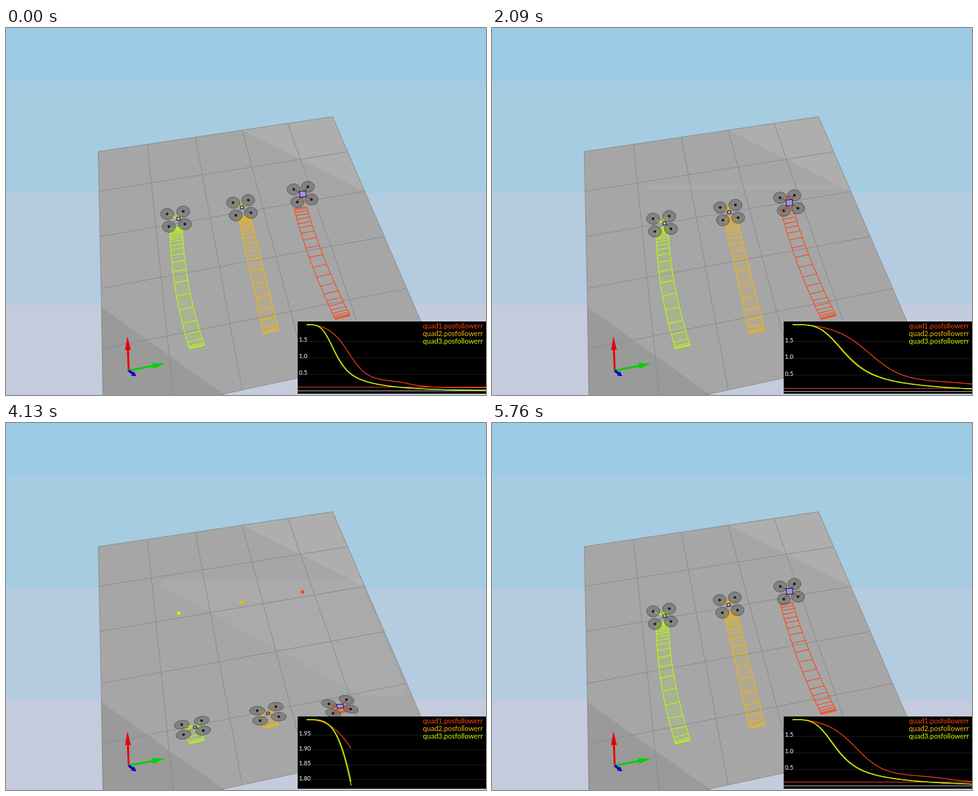
Recreate the animation shown at these times as an HTML page with a canvas. Size 757 px wide and 579 px high, loop 5860 ms.

```html
<!DOCTYPE html>
<html lang="en">
<head>
<meta charset="utf-8">
<title>Quadrotor position following</title>
<style>
  html, body { margin: 0; width: 100%; height: 100%; overflow: hidden; background: #c4cbdc; }
  canvas { position: absolute; left: 0; top: 0; display: block; }
  .legend { position: absolute; right: 5px; top: 464px; text-align: right;
    font: 400 11.1px/12px Lato, "Open Sans", sans-serif; }
  .legend div { height: 12px; white-space: nowrap; }
</style>
</head>
<body>
<canvas id="view" width="757" height="579"></canvas>
<div class="legend">
  <div style="color:#ff4410">quad1.posfollowerr</div>
  <div style="color:#ffbf00">quad2.posfollowerr</div>
  <div style="color:#bfff00">quad3.posfollowerr</div>
</div>
<script>
const W = 757, H = 579, LOOP = 5860;
const RATE = 0.25;                     // plot units per ms
const STARTS = [-2880, 514, 3850];     // launch times within the loop
const STEP = 14, TRAIL_END = 322;      // trail sampling

const ctx = document.getElementById('view').getContext('2d');
const clamp = v => Math.max(0, Math.min(1, v));
const mix = (a, b, k) => a + (b - a) * k;
const bump = (u, mid, width) => Math.exp(-(((u - mid) / width) ** 2));
const fall = (u, mid, power) => 1 / (1 + (u / mid) ** power);

// Position error over time: a main drop followed by a slow settling tail.
const errFast = u => 1.8 * fall(u, 118, 3.8) + 0.2 * fall(u, 330, 4);
const errSlow = u => {
  const growth = Math.exp((u - 169) / 37) * (1 - bump(u, 0, 50));
  return 1.71 / (1 + growth) + 0.2 * fall(u, 420, 12) + 0.09;
};

// Lean forward to accelerate (negative), back to brake (positive).
const tilt = u => bump(u, 205, 70) - bump(u, 58, 34);

const quads = [
  { color: '#ff4410', from: [531, 456.5], to: [459, 263.5], dot: [467.5, 266.5],
    bow: 24, miss: 0.05, drift: 9, pace: 0.8, hub: 11, hubX: 0.5, fill: 0, err: errSlow },
  { color: '#f8b800', from: [418, 479], to: [372, 282.5], dot: [372, 283],
    bow: 0, miss: 0, drift: 0, pace: 1, hub: 6, hubX: 0, fill: 0.13, err: u => errFast(u * 0.982) },
  { color: '#b9ff00', from: [301, 503], to: [268.2, 300.4], dot: [272.5, 300],
    bow: 33, miss: 0, drift: 0, pace: 1, hub: 6, hubX: 4, fill: 0.13, err: errFast }
];

// Remaining share of the way, and the point on the path that belongs to it.
const remaining = (q, u) => q.err(u) / 2 - q.miss * clamp((u - 250) / 60);
const pathAt = (q, f) => [
  mix(q.to[0], q.from[0], f) - q.bow * f * (1 - f),
  mix(q.to[1], q.from[1], f)
];

function poly(points, fill, stroke, closed = true) {
  ctx.beginPath();
  points.forEach(([x, y], i) => i ? ctx.lineTo(x, y) : ctx.moveTo(x, y));
  if (closed) ctx.closePath();
  if (fill) { ctx.fillStyle = fill; ctx.fill(); }
  if (stroke) { ctx.strokeStyle = stroke; ctx.stroke(); }
}
const line = (p, q, color) => poly([p, q], null, color, false);
function rect(x, y, w, h, color) { ctx.fillStyle = color; ctx.fillRect(x, y, w, h); }
function oval(x, y, rx, ry, turn, fill, stroke) {
  ctx.beginPath();
  ctx.ellipse(x, y, rx, ry, turn, 0, Math.PI * 2);
  ctx.fillStyle = fill;
  ctx.fill();
  if (stroke) { ctx.strokeStyle = stroke; ctx.stroke(); }
}

// Perspective map of the unit square to four screen corners.
function perspective([x0, y0], [x1, y1], [x2, y2], [x3, y3]) {
  const ax = x1 - x2, ay = y1 - y2, bx = x3 - x2, by = y3 - y2;
  const sx = x0 - x1 + x2 - x3, sy = y0 - y1 + y2 - y3, det = ax * by - ay * bx;
  const g = (sx * by - sy * bx) / det, h = (ax * sy - ay * sx) / det;
  return (s, t) => {
    const w = 1 + g * s + h * t;
    return [
      (x0 + (x1 - x0 + g * x1) * s + (x3 - x0 + h * x3) * t) / w,
      (y0 + (y1 - y0 + g * y1) * s + (y3 - y0 + h * y3) * t) / w
    ];
  };
}
const project = perspective([145.5, 195], [515, 140], [632, 411], [152, 506]);
const tile = (col, row) => project(col / 5, row / 4);

function drawWorld(top) {
  ['#9bcbe5', '#a5cce1', '#b4cbe0', '#c4cbdc']
    .forEach((color, i) => rect(0, i && 84 + (i - 1) * 176.5 | 0, W, H, color));

  const floor = [tile(0, 0), tile(5, 0), tile(5, 5), tile(0, 5)];
  ctx.lineWidth = 1;
  poly(floor, '#a6a6a6');
  poly([[372, 161], tile(5, 0), tile(5, 2)], '#aeaeae');
  poly([[150, 440], [345, 579], [152, 579]], '#9a9a9a');
  if (top > 250) {
    ctx.save();
    ctx.beginPath();
    ctx.rect(244, 247, 420, top - 247);
    ctx.clip();
    poly([[244, 247], [559, 247], [655, 482], [378, 330], [244, 257]], 'rgba(255,255,255,.045)');
    ctx.restore();
  }
  for (let i = 1; i < 5; i++) {
    line(tile(i, 0), tile(i, 5), '#8a8a8a');
    line(tile(0, i), tile(5, i), '#8a8a8a');
  }
  poly(floor, null, '#8c8c8c');
}

// Shaft from the origin with a cone at its end.
function drawArrow(dx, dy, shaft, width, half, color) {
  const x = 193.5, y = 540.5, len = Math.hypot(dx, dy), nx = -dy / len * half, ny = dx / len * half;
  const bx = x + dx * shaft, by = y + dy * shaft;
  ctx.lineWidth = width;
  line([x, y], [bx, by], color);
  poly([[x + dx, y + dy], [bx + nx, by + ny], [bx - nx, by - ny]], color);
}

function drawTrail(q, u) {
  const left = [], right = [];
  for (let s = 0; s <= Math.min(u, TRAIL_END); s += STEP) {
    const f = remaining(q, s), [x, y] = pathAt(q, f);
    const dx = mix(9.5, 11.8, f), dy = mix(-1.6, -2.9, f);
    left.push([x - dx, y - dy]);
    right.push([x + dx, y + dy]);
  }
  ctx.lineWidth = 1.1;
  ctx.globalAlpha = q.fill;
  poly([...left, ...right.slice().reverse()], q.color);
  ctx.globalAlpha = 1;
  poly(left, null, q.color, false);
  poly(right, null, q.color, false);
  left.forEach((p, i) => line(p, right[i], q.color));
}

function poseOf(q, u, i) {
  const f = remaining(q, u), k = tilt(u * q.pace), [x, y] = pathAt(q, f);
  const size = 1 + 0.13 * f, ahead = Math.max(0, -k), back = Math.max(0, k);
  return {
    x: x + q.drift * clamp((u - 290) / 150), y,
    a: [14 * size * (1 + 0.1 * ahead), 8 * size * (1 - 0.55 * ahead + 0.3 * back)],
    b: [(8.3 + 1.5 * i) * size * (1 + 0.15 * ahead), -12 * size * (1 - 0.2 * ahead - -0.08 * back)],
    rx: 10.3 * size * (1 + 0.05 * ahead),
    ry: 8.8 * size * (1 - 0.36 * ahead + 0.13 * back),
    turn: 0.2 * ahead * (1 - i)
  };
}

function drawQuad(q, { x, y, a, b, rx, ry, turn }) {
  const rotors = [[a, -1], [b, 1], [b, -1], [a, 1]].map(([v, s]) => [x + s * v[0], y + s * v[1]]);
  const hx = x + q.hubX, hy = y - 0.5, big = q.hub > 8;
  ctx.lineWidth = 2.4;
  rotors.forEach((r, i) => {
    ctx.globalAlpha = i < 2 || big ? 1 : 0.4;
    line([hx, hy], r, i < 2 || big ? q.color : '#77728c');
  });
  ctx.globalAlpha = 1;
  ctx.lineWidth = 1;
  for (const r of rotors) oval(...r, rx, ry, turn, 'rgba(108,108,108,.62)', '#585858');
  for (const r of rotors) {
    oval(...r, 2.1, 2.1, 0, '#15151f');
    rect(r[0], r[1] - 1, 1.5, 1.5, '#20208c');
  }
  const s = q.hub / 2, h = s * Math.min(1, ry / rx + 0.08);
  ctx.lineWidth = 1.2;
  poly([[hx - s, hy - h + 1], [hx + s - 1, hy - h], [hx + s, hy + h - 1], [hx - s + 1, hy + h]],
    big ? '#9c94e6' : 'rgba(205,200,240,.5)', '#1c1c50');
}

function drawPlot(u) {
  const low = Math.min(...quads.map(q => q.err(u)), 1.998);
  const lo = low * clamp((low - 0.04) / 0.1);
  const yOf = e => 468 + (2 - e) * 104 / (2 - lo);
  const sx = Math.min(1, 283 / Math.max(u, 1));
  const level = (y, color) => line([460, Math.round(y) + 0.5], [W, Math.round(y) + 0.5], color);

  rect(460, 463, 297, 114, '#000');
  ctx.save();
  ctx.beginPath();
  ctx.rect(460, 463, 297, 114);
  ctx.clip();
  ctx.lineWidth = 1;
  ctx.font = '400 9.5px Lato, "Open Sans", sans-serif';
  ctx.textBaseline = 'middle';

  // Smallest 1-2-5 step that gives fewer than five intervals.
  const range = 2 - lo, ten = 10 ** Math.floor(Math.log10(range / 5));
  const step = [1, 2, 5, 10].map(m => m * ten).find(s => range / s < 5);
  const digits = Math.max(1, -Math.floor(Math.log10(step) + 1e-9));
  for (let e = 2 - step; yOf(e) < 566; e -= step) {
    level(yOf(e), '#1c1c1c');
    ctx.fillStyle = '#fff';
    ctx.fillText(e.toFixed(digits), 462, yOf(e) - 1.5);
  }
  if (lo < 0.1) level(yOf(0.1) - 0.5, '#e0402c');
  if (lo < 0.04) level(yOf(0) - 0.5, '#b8b8b8');

  ctx.lineWidth = 1.25;
  for (const q of quads) {
    const pts = [];
    for (let v = 0; v < u; v += 3) pts.push([474 + v * sx, yOf(q.err(v))]);
    pts.push([474 + u * sx, yOf(q.err(u))]);
    poly(pts, null, q.color, false);
  }
  ctx.restore();
}

function drawCursor(x, y) {
  ctx.lineWidth = 1;
  poly([[0, 0], [0, 15], [3.5, 12], [6, 17.5], [8.5, 16.5], [6, 11], [10.5, 11]]
    .map(([dx, dy]) => [x + dx, y + dy]), '#000', '#fff');
}

function draw(now) {
  const t = now % LOOP;
  const u = (t - STARTS.filter(s => s <= t).pop()) * RATE;
  const poses = quads.map((q, i) => poseOf(q, u, i));
  drawWorld(Math.min(...poses.map(p => p.y + p.b[1] - p.ry)));
  drawArrow(-2, -54, 0.6, 3, 4.5, '#e80000');
  drawArrow(57, -11, 0.66, 3, 4.5, '#00d000');
  drawArrow(12, 9, 0.5, 4, 4, '#0000cc');
  quads.forEach(q => drawTrail(q, u));
  quads.forEach(q => oval(...q.dot, 2.8, 2.8, 0, q.color));
  quads.forEach((q, i) => drawQuad(q, poses[i]));
  drawPlot(u);
  if (t > 4800 && t < 5200) drawCursor(739.5, 541.5);
}

const begin = performance.now();
function tick() {
  draw(performance.now() - begin);
  requestAnimationFrame(tick);
}
tick();
</script>
</body>
</html>
```
